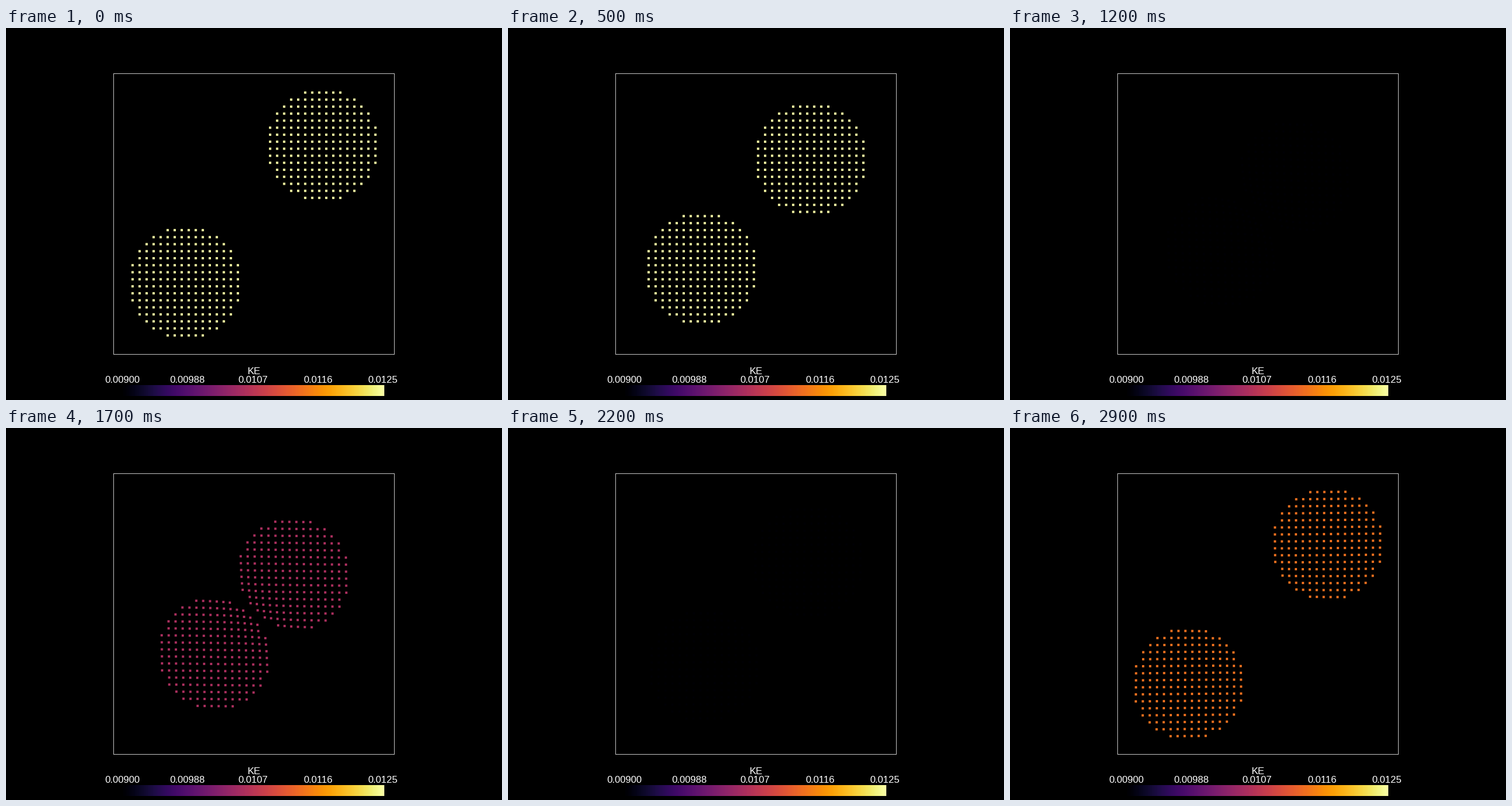
These frames come from a looping animation (864 by 648 pixels, 3 s). A matplotlib script:

```python
import numpy as np
import matplotlib.pyplot as plt
from matplotlib.animation import FuncAnimation
from matplotlib.collections import PolyCollection
from matplotlib.patches import Rectangle

W, H = 864, 648
FRAMES, STEP_MS = 30, 100
CENTER = np.array([432, 324])
PITCH = 489 / 40          # particle spacing in pixels
DOT = 4

START = 119.8             # initial offset of each disc along x and y
V_IN, V_OUT = 4.89, 4.38  # speed before and after the impact, px per frame
HIT, FREE = 10, 18        # frames between which the discs touch
S_HIT, S_FREE = START - V_IN * HIT, 72.7

cmap = plt.get_cmap("inferno")

# Lattice points inside a disc of eight cells radius
axis = np.arange(-7.5, 8)
gx, gy = (a.ravel() for a in np.meshgrid(axis, axis))
disc = PITCH * np.column_stack([gx, gy])[gx**2 + gy**2 < 64]
square = DOT * np.array([[-.5, -.5], [.5, -.5], [.5, .5], [-.5, .5]])
normal = np.array([1, -1]) / np.sqrt(2)   # line of impact
RADIUS = (disc @ normal).max()


def contact(k):
    """Progress of the impact from 0 to 1."""
    return (k - HIT) / (FREE - HIT)


def offset(k):
    """Distance of a disc centre from the box centre, per axis."""
    if k <= HIT:
        return START - V_IN * k
    if k >= FREE:
        return S_FREE + V_OUT * (k - FREE)
    u, span = contact(k), FREE - HIT
    return (S_HIT + (S_FREE - S_HIT) * u * u * (3 - 2 * u)
            - V_IN * span * u * (1 - u) ** 2
            - V_OUT * span * u * u * (1 - u))


def strain(k):
    """Stretch along the line of impact: squeeze, then ringing."""
    if k <= HIT:
        return 0
    if k < FREE:
        return -0.03 * np.sin(np.pi * contact(k))
    return 0.004 + 0.006 * np.cos(2 * np.pi * (k - 20) / 10)


def energy(k):
    """Kinetic energy on the 0 to 1 scale of the colour bar."""
    if k <= HIT:
        return 1
    if k <= FREE:
        return 1 - 3.7 * np.sin(np.pi * contact(k)) ** 2
    return max(1 - ((k - 19) / 3) ** 2, 1 - np.exp((23 - k) / 5.2))


def dots(k):
    s = offset(k)
    shape = disc - strain(k) * disc[:, ::-1]
    if k >= HIT:
        # Flatten the side that faces the other disc
        dent = max(2.5, RADIUS + 8 - s * np.sqrt(2))
        depth = np.clip(disc @ normal / RADIUS, 0, 1) ** 4
        shape = shape - dent * depth[:, None] * normal
    lower = shape + [-s, s]
    pts = np.vstack([CENTER + lower, CENTER - lower])
    return pts[:, None, :] + square


fig = plt.figure(figsize=(W / 72, H / 72), dpi=72, facecolor="black")
ax = fig.add_axes([0, 0, 1, 1])
ax.set_axis_off()

# Colour bar
ax.imshow(np.linspace(0, 1, 256)[None, :], cmap=cmap, aspect="auto",
          extent=(204, 659, 641, 622), interpolation="nearest")
ax.set_xlim(0, W)
ax.set_ylim(H, 0)


def label(x, y, text, size):
    ax.text(x, y, text, color="white", size=size, family="Liberation Sans",
            ha="center", va="baseline")


label(432, 603, "KE", 17.2)
for i, text in enumerate(["0.00900", "0.00988", "0.0107", "0.0116", "0.0125"]):
    label(202.8 + 113.5 * i, 618, text, 17)

ax.add_patch(Rectangle((187, 79), 489, 489, fill=False, lw=1,
                       ec="#c8c8c8", antialiased=False))
cloud = PolyCollection([], edgecolors="none", snap=False)
ax.add_collection(cloud, autolim=False)


def update(k):
    cloud.set_verts(dots(k))
    cloud.set_facecolor(cmap(float(energy(k))))
    return [cloud]


anim = FuncAnimation(fig, update, frames=FRAMES, interval=STEP_MS,
                     repeat=True, repeat_delay=0)
plt.show()
```
